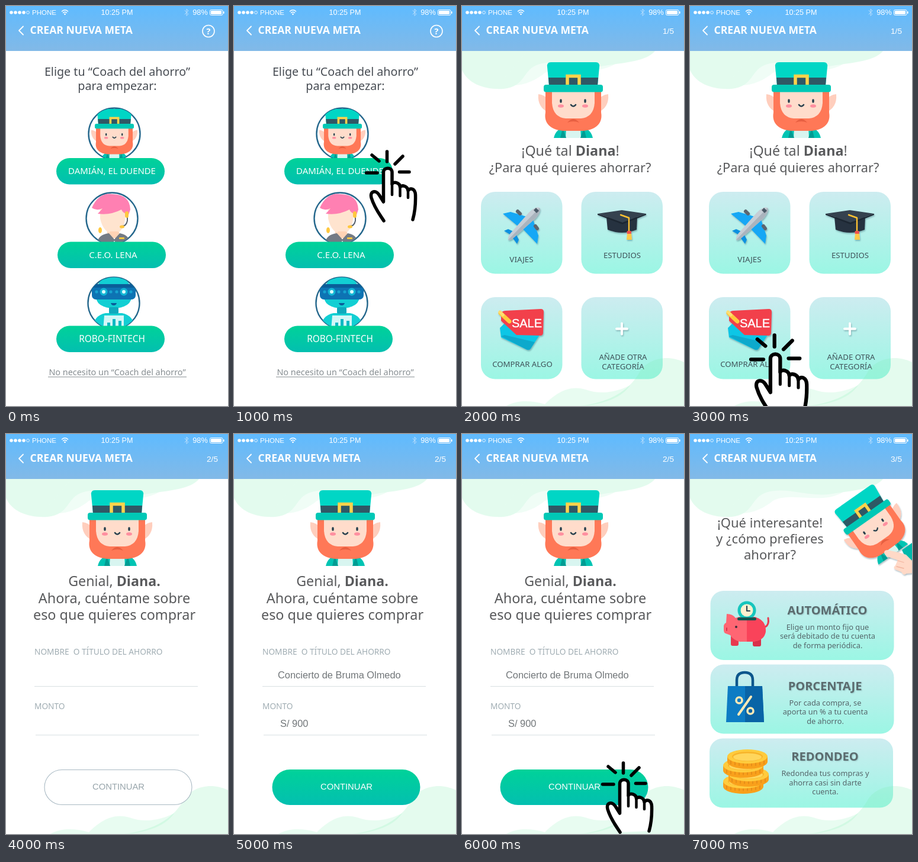
Recreate the animation shown at these times as an HTML page. Size 375 by 676 pixels, loop 8000 ms.

```html
<!DOCTYPE html>
<html lang="es">
<head>
<meta charset="utf-8">
<title>Crear nueva meta</title>
<style>
html, body { margin: 0; width: 100%; height: 100%; overflow: hidden; background: #fff; }
svg { display: block; width: 100vw; height: 100vh; font-family: "Noto Sans", "Open Sans", sans-serif; }
.sys { font-family: "Liberation Sans", Arial, sans-serif; }
</style>
</head>
<body>
<svg id="stage" viewBox="0 0 375 676">
  <defs>
    <linearGradient id="sky" x2="0" y2="1"><stop stop-color="#5fbbff"/><stop offset="1" stop-color="#82b9e7"/></linearGradient>
    <linearGradient id="green" x2="0" y2="1"><stop stop-color="#00d299"/><stop offset="1" stop-color="#03bfb0"/></linearGradient>
    <linearGradient id="mint" x2="0" y2="1"><stop stop-color="#cdecf0"/><stop offset="1" stop-color="#9bf6e4"/></linearGradient>
    <clipPath id="ring"><circle r="43.5"/></clipPath>
    <filter id="soft" x="-20%" y="-20%" width="140%" height="150%"><feDropShadow dx="1" dy="2" stdDeviation="1.2" flood-color="#245" flood-opacity=".35"/></filter>

    <g id="elf">
      <path d="M155 223Q159 206 176 205H200Q217 206 221 223Z" fill="#00c4b3"/>
      <path d="M176 205H200L201 223H175Z" fill="#d8f5f0"/>
      <path d="M170 206L176 223H166ZM206 206L200 223H210Z" fill="#009c93"/>
      <path d="M147 180Q127 172 129 149Q140 150 148 160ZM229 180Q249 172 247 149Q236 150 228 160Z" fill="#ffcebd"/>
      <path d="M141 144H235V180C239 202 220 211 202 211H174C156 211 137 202 141 180Z" fill="#ff7857"/>
      <path d="M152 144H224V164Q222 188 201 190H175Q154 188 152 164Z" fill="#ffdccb"/>
      <path d="M178 197Q188 185 198 197Q188 193 178 197Z" fill="#e85f41"/>
      <ellipse cx="167" cy="169" rx="5" ry="2.8" fill="#ff8fa0"/>
      <ellipse cx="208" cy="169" rx="5" ry="2.8" fill="#ff8fa0"/>
      <g fill="none" stroke="#263f4d" stroke-width="3.4" stroke-linecap="round">
        <path d="M167 159V162M208 159V162"/><path d="M184 167Q188 172 192 167" stroke-width="2.6"/>
      </g>
      <path d="M150 95H226Q233 95 232 103L229 135H147L144 103Q143 95 150 95Z" fill="#00d6c5"/>
      <path d="M146 121H230L229 134H147Z" fill="#2f5865"/>
      <path d="M178 134V118.5H198V134" fill="none" stroke="#ffd34c" stroke-width="5.5"/>
      <rect x="138" y="133" width="100" height="12.5" rx="4" fill="#00c8b6"/>
    </g>

    <g id="tap" fill="none" stroke="#000" stroke-width="5.5" stroke-linecap="round" stroke-linejoin="round">
      <path d="M258.5 246V263M233 252L245 262M285 254L272 267M223.5 282H242M279.5 280.5H296"/>
      <path fill="#fff" d="M253 363C246 352 237 341 232 324C229 312 240 311 245 319L252.5 331V281C252.5 272 267 272 267 281V301C269 296 280 298 280.5 306C284 302 293 304 294 312C298 306 306 309 306.5 319C307 336 306 347 302 361"/>
      <path d="M267 300V319M280.5 305V321M294 311V324" stroke-width="4.5"/>
    </g>
  </defs>
</svg>
<script>
const stage = document.getElementById('stage');
const GREY = '#58595b';

const text = (x, y, size, str, o = {}) =>
  `<text x="${x}" y="${y}" font-size="${size}" fill="${o.fill || GREY}" font-weight="${o.w || 400}"` +
  ` text-anchor="${o.left ? 'start' : 'middle'}" xml:space="preserve" class="${o.c || ''}" ${o.more || ''}>${str}</text>`;
const lines = (x, y, gap, size, list, o) => list.map((s, i) => text(x, y + i * gap, size, s, o)).join('');
const box = (x, y, w, h, r, fill, more = '') =>
  `<rect x="${x}" y="${y}" width="${w}" height="${h}" rx="${r}" fill="${fill}" ${more}/>`;
const path = (d, fill, more = '') => `<path d="${d}" fill="${fill}" ${more}/>`;
const line = (d, color, w) => path(d, 'none', `stroke="${color}" stroke-width="${w}" stroke-linecap="round" stroke-linejoin="round"`);
const dot = (x, y, r, fill, more = '') => `<circle cx="${x}" cy="${y}" r="${r}" fill="${fill}" ${more}/>`;
const oval = (x, y, rx, ry, fill) => `<ellipse cx="${x}" cy="${y}" rx="${rx}" ry="${ry}" fill="${fill}"/>`;
const at = (x, y, body) => `<g transform="translate(${x} ${y})">${body}</g>`;
const shaded = s => `<g filter="url(#soft)">${s}</g>`;

function header(page) {
  let s = box(0, 0, 375, 76, 0, 'url(#sky)');
  for (let i = 0; i < 4; i++) s += dot(9 + i * 7, 11, 2.8, '#fff');
  s += dot(37, 11, 2.4, 'none', 'stroke="#fff" stroke-width=".8"');
  const sys = { fill: '#fff', c: 'sys' };
  s += text(44, 15, 11.5, 'PHONE', { ...sys, left: 1 });
  s += line('M94.5 9Q99.5 4.5 104.5 9M96.5 11.5Q99.5 9 102.5 11.5', '#fff', 1.5) + dot(99.5, 13.8, 1.4, '#fff');
  s += text(187.5, 15, 12.6, '10:25 PM', sys);
  s += line('M302 7.5L308 13.5L305 16.5V5L308 8L302 14', '#b9defc', 1);
  s += text(328, 14.5, 12.8, '98%', sys);
  s += box(344.5, 6.5, 21.5, 9, 2, 'none', 'stroke="#fff"') + box(346, 8, 18, 6, .8, '#fff') + box(367, 9, 1.6, 4, .8, '#fff');
  s += line('M29 34.5L22 41.5L29 48.5', '#fff', 1.8);
  s += text(40.5, 47.3, 17.6, 'CREAR NUEVA META', { fill: '#fff', w: 700, left: 1 });
  s += page ? text(348.5, 46.5, 13.7, page, sys)
    : dot(342, 42.5, 10, 'none', 'stroke="#fff" stroke-width="1.6"') + text(342, 47.7, 14.5, '?', { fill: '#fff', w: 600 });
  return s;
}

const waveTop =
  path('M0 76V108C10 132 40 142 70 140C108 136 102 108 128 99C165 88 200 108 240 101C280 95 312 93 326 76Z', '#e3fbee') +
  path('M64 131C95 140 122 128 140 113C170 96 225 122 262 96L290 76H110Z', '#e3fbee', 'opacity=".55"');
const waveEnd =
  path('M375 602C345 587 313 598 301 617C288 641 262 668 200 676H375Z', 'rgb(120 235 170 / .2)') +
  path('M75 676C92 666 115 666 140 673C158 655 180 640 208 648C236 658 262 652 284 641C270 662 240 673 200 676Z', 'rgb(120 235 170 / .17)');

// ---- choose a coach
const boss =
  path('M-8 -5V34H12V-5Z', '#ffd3b5') +
  path('M-20 -22H22V2Q19 24 3 27Q-15 24 -20 0Z', '#ffe4cf') +
  path('M-26 46Q-25 27 -5 25L4 35L13 25Q31 28 31 46Z', '#737b85') +
  path('M-5 25L4 35L13 25L10 22H-3Z', '#ffd3b5') +
  path('M-34 -18Q-22 -45 2 -41Q30 -40 31 -15L28 -6Q18 -9 16 -15Q-3 -5 -24 -8Q-19 -13 -16 -17Q-26 -12 -34 -18Z', '#ff80b2') +
  line('M26 -10V4Q24 13 17 13', '#59636e', 2) +
  box(22, -12, 6, 11, 3, '#ffc83f') + oval(-20, 20, 3, 5, '#ffc83f') + oval(17, 14, 4, 2.6, '#ffc83f') +
  box(12, 32, 9, 3, 1, '#ffc83f') + dot(4, 34, 1, '#fff') + dot(4, 39, 1, '#fff');
const robot =
  path('M-29 -20Q-27 -45 0 -45Q27 -45 29 -20V-5Q24 8 0 9Q-24 8 -29 -5Z', '#12cfd3') +
  path('M-36 46Q-35 21 -14 17H14Q35 21 36 46Z', '#12cfd3') +
  box(-8, 7, 16, 11, 2, '#0fa9bd') +
  box(-37, -32, 74, 26, 7, '#0d73b3') + box(-37, -32, 74, 6, 3, '#0a5d99') +
  [-17, 17].map(x => dot(x, -19, 6.5, '#12b6d4') + dot(x, -19, 3, '#d9fbff')).join('') +
  [-29, -5, 5, 29].map(x => dot(x, -19, 2.6, '#16a2d0')).join('') +
  path('M-5 0H5Q4 4 0 4Q-4 4 -5 0Z', '#0a5d99') +
  path('M-16 21H17V46H-18Z', '#d3f6f7') +
  box(-11, 33, 5, 12, 0, '#0fb8c4') + box(-2, 27, 5, 18, 0, '#0fb8c4') + box(8, 30, 5, 15, 0, '#0fb8c4');
const elfSmall = '<use href="#elf" transform="translate(0 -17) scale(.66) translate(-188 -133)"/>';

function coach(cx, cy, art, bx, by, label) {
  const ring = dot(0, 0, 43.5, 'none', 'stroke="#24678c" stroke-width="2.4"');
  return at(cx, cy, dot(0, 0, 43.5, '#fff') + ring + `<g clip-path="url(#ring)">${art}</g>`) +
    box(bx, by, 183, 44.5, 22.2, 'url(#green)') + text(...label, { fill: '#fff', w: 500 });
}
const coaches = header() +
  lines(188, 118, 24, 19.7, ['Elige tu “Coach del ahorro”', 'para empezar:'], { fill: '#484d54' }) +
  coach(183, 216, elfSmall, 85, 257, [179, 284, 14.9, 'DAMIÁN, EL DUENDE']) +
  coach(179, 359, boss, 87, 398.5, [181, 425.5, 15, 'C.E.O. LENA']) +
  coach(182, 502, robot, 85, 540.5, [179, 567.5, 15.4, 'ROBO-FINTECH']) +
  text(188, 624, 14.4, 'No necesito un “Coach del ahorro”', { fill: '#868d91' }) +
  box(71, 626.4, 234, 1, 0, '#868d91');

// ---- choose a goal
const plane =
  path('M69 351L82 348L116 358L98 375ZM127 402L129 388L119 358L101 375Z', '#12a7f5') +
  path('M71 380L78 377L91 383L86 389ZM93 402L96 395L90 383L84 390Z', '#0d91e0') +
  line('M94 347L98 351M124 372L127 376', '#5b6570', 6) +
  path('M78 395Q77 390 82 384L113 349Q124 338 131 341Q134 347 124 359L88 391Q81 397 78 395Z', '#c6ced6') +
  path('M78 395L131 341Q134 347 124 359L88 391Q81 397 78 395Z', '#aab4be') +
  path('M121 345L126 350L130 346L125 341Z', '#4c5a68');
const cap =
  path('M244 357H296L295 378Q270 388 246 378Z', '#26323f') +
  path('M229 351L270 345L311 351L271 366Z', '#34424f') +
  path('M229 351L271 366L311 351V353L271 369L229 353Z', '#1d2832') +
  line('M268 353L282 358V381', '#ffc233', 2.4) +
  box(278.5, 380, 7.5, 5, 1.5, '#ef5350') + path('M279 385H286L287 395H278Z', '#ffc94a');
const tag =
  path('M64 544L75 533H133L131 556L116 579Q113 583 108 580L66 560Z', '#10c6e6') +
  path('M66 558L108 580Q113 583 116 579L123 568L72 556Z', '#0ea9cc') +
  path('M73 515L133 512Q138 512 138 517L137 552Q137 557 132 557L92 556L66 532V521Q67 515 73 515Z', '#f23f4c') +
  line('M65 519L80 533', '#ffc93c', 7) + line('M64 517L69 522', '#ffdd73', 5) +
  text(109.5, 543, 20, 'SALE', { fill: '#fff', c: 'sys', more: 'stroke="#fff" stroke-width=".4"' });
const label = { fill: '#40535a', w: 500 };
const bigElf = '<use href="#elf"/>';
const goals = waveTop + header('1/5') + bigElf +
  text(183, 253, 23.3, '¡Qué tal <tspan font-weight="700">Diana</tspan>!') +
  text(182.5, 281, 21.7, '¿Para qué quieres ahorrar?') +
  [[32, 314], [201.5, 314], [32, 492], [201.5, 492]].map(p => box(...p, 137.5, 138.5, 24, 'url(#mint)')).join('') +
  shaded(plane) + shaded(cap) + shaded(tag) +
  shaded(line('M261 545.5H279M270 536.5V554.5', '#fff', 3.8)) +
  text(100.5, 433, 13.4, 'VIAJES', label) + text(270.5, 426, 13.2, 'ESTUDIOS', label) +
  text(102, 609.5, 13.2, 'COMPRAR ALGO', label) +
  lines(272, 598, 15.5, 13.2, ['AÑADE OTRA', 'CATEGORÍA'], label) + waveEnd;

// ---- name and amount
const hint = { fill: '#a0adb3', w: 500, left: 1 };
const typed = { fill: '#707578', c: 'sys', left: 1 };
const form = waveTop + header('2/5') + bigElf +
  text(183, 257, 23.2, 'Genial, <tspan font-weight="700">Diana.</tspan>') +
  lines(183, 285.5, 28.5, 23.4, ['Ahora, cuéntame sobre', 'eso que quieres comprar']) +
  text(48, 372.5, 13.7, 'NOMBRE  O TÍTULO DEL AHORRO', hint) + text(48, 465, 13.7, 'MONTO', hint) +
  box(48, 426, 276, 1, 0, '#d8dfe2') + box(50, 508.3, 276, 1, 0, '#d8dfe2') + waveEnd;
const blank = box(65, 567.5, 249, 59, 29.5, '#fff', 'stroke="#a9b9c3" stroke-width="1.1"') +
  text(190, 601.3, 14.8, 'CONTINUAR', { fill: '#98a5ab', c: 'sys' });
const filled = text(74, 412.5, 16.4, 'Concierto de Bruma Olmedo', typed) + text(78, 495, 16.4, 'S/ 900', typed) +
  box(64.5, 567, 250, 60, 30, 'url(#green)') + text(190, 601.3, 14.8, 'CONTINUAR', { fill: '#fff', c: 'sys' });

// ---- ways to save
const pig =
  line('M127 326Q134 323 132 311', '#e8394f', 3) +
  box(69, 340, 13, 18, 3, '#e8394f') + box(106, 340, 14, 19, 3, '#d9304a') +
  path('M61 319L62 304Q72 304 77 311Q83 308 96 308Q128 308 128 333Q126 350 104 351H84Q73 348 68 340L60 337Q57 336 57 331V324Q58 320 61 319Z', '#ff6673') +
  path('M96 308Q128 308 128 333Q126 350 104 351H96Z', '#f9435a') +
  dot(78, 326, 2, '#40303d') + line('M62 328V332', '#d9304a', 2) +
  dot(96, 298, 15.5, '#17c6bd') + dot(96, 298, 10.5, '#fff1cf') +
  line('M96 291V299H101', '#2e4654', 2.2) + box(80, 310, 32, 5, 2.5, '#15554f');
const bag =
  line('M79 428V416Q79 403 92.5 403Q106 403 106 416V428', '#0c568c', 4.5) +
  path('M64 426H122L125 487H61Z', '#0d7cc4') + path('M93 426H122L125 487H93Z', '#0964a6') +
  line('M103 444L82 474', '#ffe9b5', 4) +
  dot(83, 450, 5, 'none', 'stroke="#ffe9b5" stroke-width="3.6"') + dot(102, 468, 5, 'none', 'stroke="#ffe9b5" stroke-width="3.6"');
const coin = (x, y) => {
  let s = path(`M${x - 34} ${y}V${y + 9}A34 12 0 0 0 ${x + 34} ${y + 9}V${y}Z`, '#f9a01b');
  for (let i = -4; i < 5; i++) s += line(`M${x + i * 7} ${y + 10 - i * i * .2}v6`, '#d9821a', 1.2);
  return s + oval(x, y, 34, 12, '#ffcb3d') + oval(x, y, 26, 8, '#f7b42a') + oval(x, y + 1, 24, 6.5, '#ffd65c');
};
const coins = coin(90, 587) + coin(99, 575) + coin(90, 560) + coin(97, 545);
const pointer =
  path('M358 196L375 184V214L366 212Z', '#00b9ab') +
  path('M329 203Q326 197 333 196L352 200L365 204L375 214V235L365 236Q361 240 357 233L347 229Q342 226 347 222L351 213L333 207Z', '#ffd9c7') +
  line('M351 214L361 217M349 224L361 227', '#f2b49f', 1.3);
const way = (x, y, tx, dy, title, body) => box(x, y, 310, 117, 22, 'url(#mint)') +
  text(tx, y + dy, 20, title, { fill: '#5b6b6e', w: 700, more: 'style="text-shadow:1px 1px 2px rgb(60 90 95 / .3)"' }) +
  lines(tx + .5, y + dy + 26, 15.6, 12.8, body, { fill: '#55666a' });
const ways = waveTop + header('3/5') +
  shaded('<use href="#elf" transform="translate(299 140) rotate(-35) scale(.92) translate(-188 -139)"/>') + shaded(pointer) +
  lines(135, 158, 27, 22, ['¡Qué interesante!', 'y ¿cómo prefieres', 'ahorrar?']) +
  way(34.5, 265, 232, 39.5, 'AUTOMÁTICO', ['Elige un monto fijo que', 'será debitado de tu cuenta', 'de forma periódica.']) +
  way(34.5, 389.5, 228, 43, 'PORCENTAJE', ['Por cada compra, se', 'aporta un % a tu cuenta', 'de ahorro.']) +
  way(33, 514.5, 228, 37.5, 'REDONDEO', ['Redondea tus compras y', 'ahorra casi sin darte', 'cuenta.']) +
  pig + bag + coins + waveEnd;

// ---- timeline: each layer is shown from one second up to another
const tap = m => `<use href="#tap" transform="${m}"/>`;
const layers = [
  [0, 2, coaches], [1, 2, tap('')],
  [2, 4, goals], [3, 4, tap('translate(99 553) scale(1.135) translate(-220 -243)')],
  [4, 7, form], [4, 5, blank], [5, 7, filled], [6, 7, tap('translate(14 310)')],
  [7, 8, ways]
].map(([from, to, art]) => {
  const el = document.createElementNS('http://www.w3.org/2000/svg', 'g');
  el.innerHTML = art;
  stage.append(el);
  return { from, to, el };
});

function draw(ms) {
  const s = (ms % 8000) / 1000;
  for (const { from, to, el } of layers) el.style.display = s >= from && s < to ? '' : 'none';
}
const start = performance.now();
function tick() {
  draw(performance.now() - start);
  requestAnimationFrame(tick);
}
draw(0);
requestAnimationFrame(tick);
</script>
</body>
</html>
```
